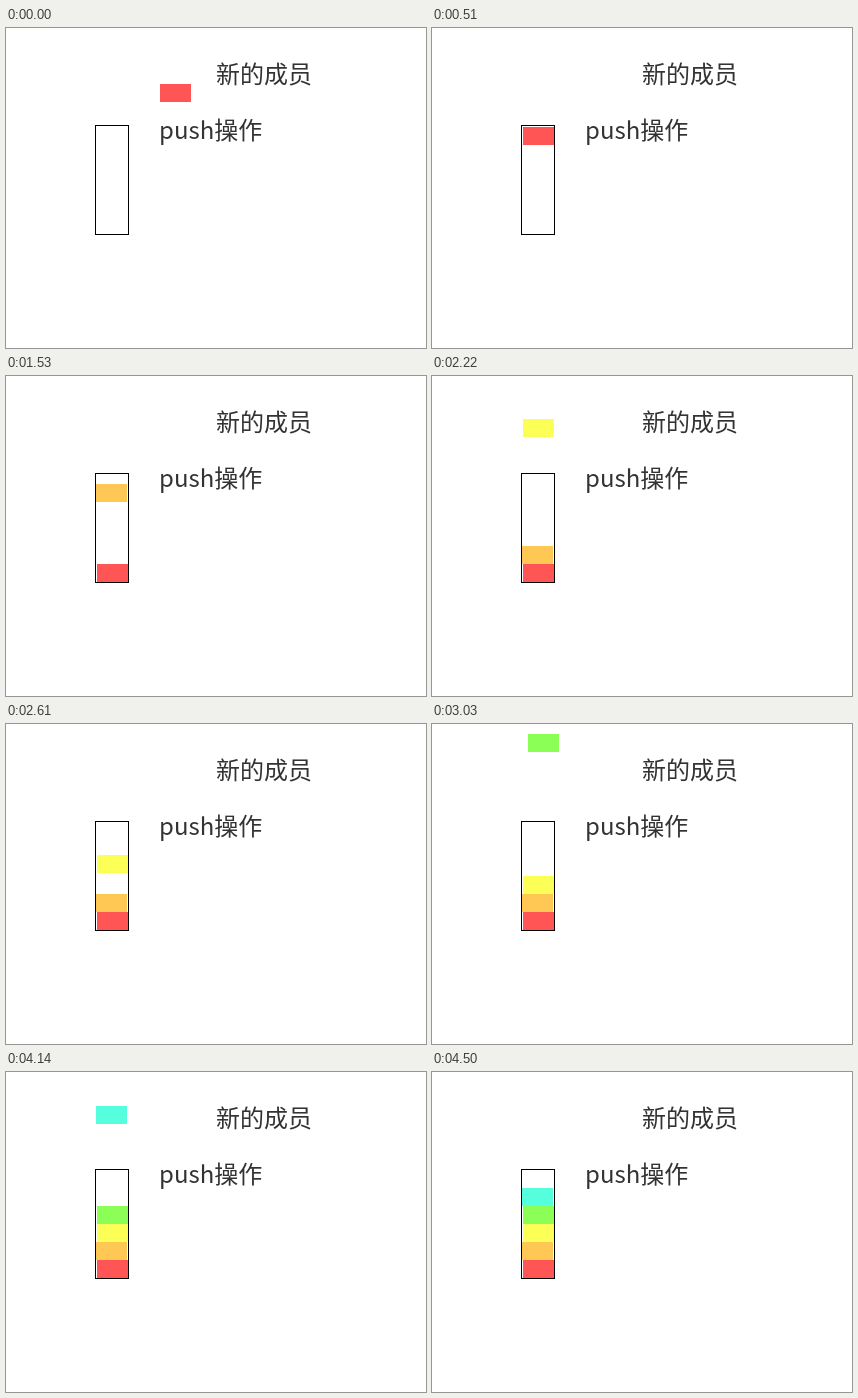
These frames come from a looping animation (420 by 320 pixels, 4900 ms). An HTML page with a canvas:

```html
<!DOCTYPE html>
<html lang="zh-CN">
<head>
<meta charset="utf-8">
<style>
  html, body { margin: 0; width: 100%; height: 100%; overflow: hidden; background: #fff; }
  canvas { display: block; }
</style>
</head>
<body>
<canvas id="stage" width="420" height="320"></canvas>
<script>
const ctx = document.getElementById('stage').getContext('2d');
const LOOP = 4900, STEP = 30, LAST_STEP = 150;
const STEPS_PER_BLOCK = 30, SLIDE_STEPS = 12;
const BLOCK = { w: 31, h: 18 };
const SLIDE = { x: -63, y: 9 };
const DROP = 122.98; // just under 123 so half pixels round down
const blocks = [
  { color: '#ff5555', x: 154 },
  { color: '#ffc855', x: 153 },
  { color: '#fcff55', x: 154 },
  { color: '#8bff55', x: 154 },
  { color: '#55ffdd', x: 153 }
];

const clamp01 = v => Math.min(1, Math.max(0, v));

function drawLabel(text, x, baseline) {
  ctx.font = '24px "Noto Sans CJK SC", "Noto Sans CJK", sans-serif';
  ctx.fillStyle = '#333';
  ctx.fillText(text, x, baseline);
}

// Each block slides over the stack, then drops onto the one below.
function drawBlock({ color, x }, index, step) {
  const age = step - index * STEPS_PER_BLOCK;
  if (age < 0) return;
  const slide = clamp01(age / SLIDE_STEPS);
  const drop = clamp01((age - SLIDE_STEPS) / (STEPS_PER_BLOCK - SLIDE_STEPS));
  const top = 56 - index * BLOCK.h + SLIDE.y * slide + DROP * drop;
  ctx.fillStyle = color;
  ctx.fillRect(Math.round(x + SLIDE.x * slide), Math.round(top), BLOCK.w, BLOCK.h);
}

function draw(time) {
  const step = Math.min(LAST_STEP, Math.floor((time % LOOP) / STEP + 1e-6));
  ctx.fillStyle = '#fff';
  ctx.fillRect(0, 0, 420, 320);
  ctx.strokeStyle = '#000';
  ctx.lineWidth = 1;
  ctx.strokeRect(89.5, 97.5, 33, 109);
  drawLabel('新的成员', 210, 55);
  drawLabel('push操作', 153, 111);
  blocks.forEach((block, i) => drawBlock(block, i, step));
}

const start = performance.now();
function tick() {
  draw(Math.max(0, performance.now() - start));
  requestAnimationFrame(tick);
}
tick();
</script>
</body>
</html>
```
